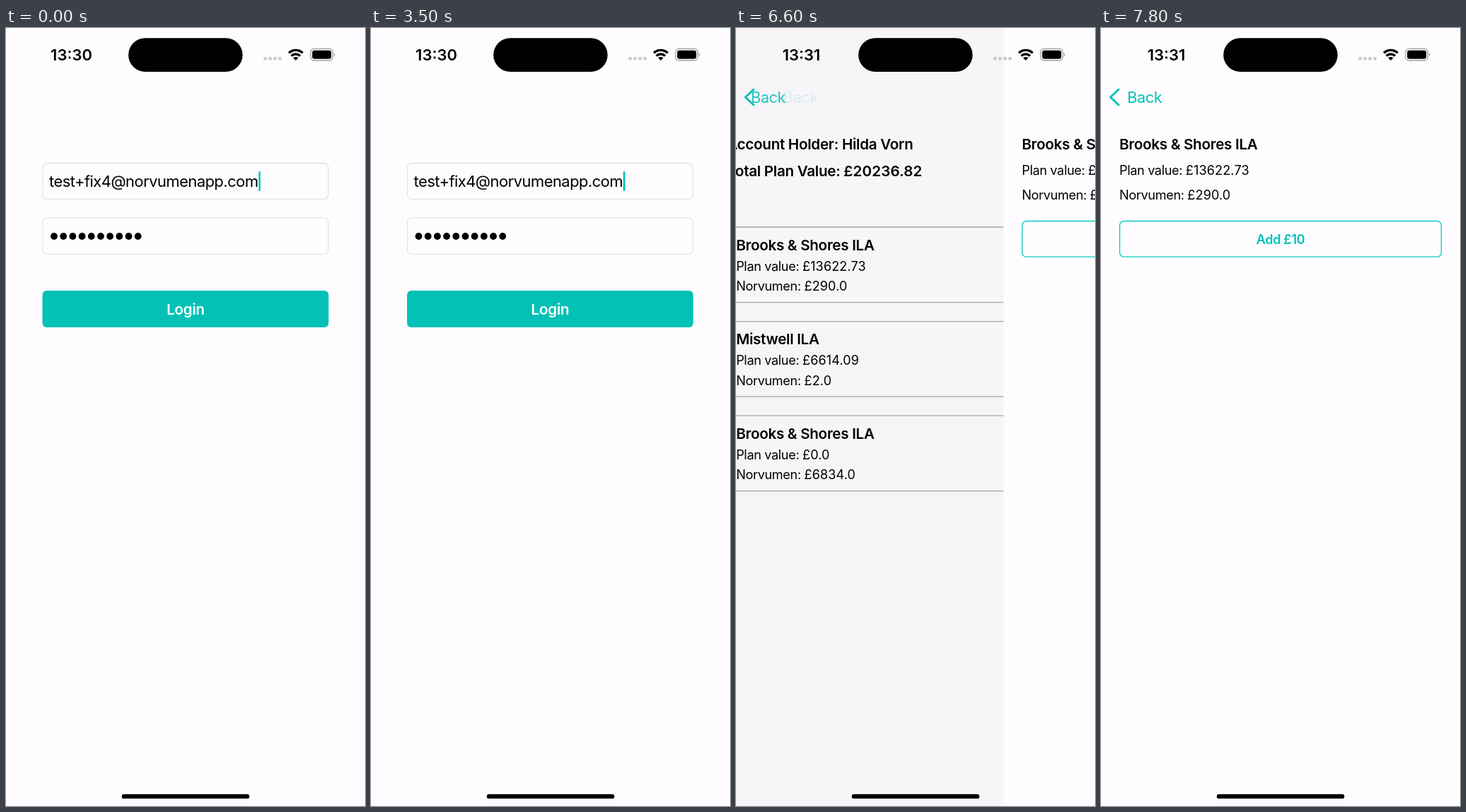
An HTML page that plays this animation: 508x1102 px, repeating every 8000 ms.

```html
<!DOCTYPE html>
<html lang="en">
<head>
<meta charset="utf-8">
<title>Savings app</title>
<style>
  html, body { margin: 0; width: 100%; height: 100%; overflow: hidden; background: #fefcff; }
  svg { display: block; }
  text { font: 18.1px Inter, sans-serif; letter-spacing: -.35px; white-space: pre; }
  .head { font-size: 20.7px; font-weight: 600; letter-spacing: -.32px; }
  .body { font-size: 22px; letter-spacing: -.56px; }
  .clock { font-size: 22px; font-weight: 600; letter-spacing: 0; }
  .sum { letter-spacing: .1px; }
  .bold { font-weight: 600; }
  .mid { text-anchor: middle; }
  .teal { fill: #03c1b6; }
  .white { fill: #fff; }
  .paper { fill: #fefcff; }
  .line { fill: none; stroke-width: 1.3; }
</style>
</head>
<body>
<svg width="508" height="1102" viewBox="0 0 508 1102">
  <g id="login"></g>
  <g id="plans"></g>
  <g id="detail"></g>
  <path id="chevron" d="M25 87 13.3 98 25 109" fill="none" stroke="#03c1b6" stroke-width="3" stroke-linecap="round" stroke-linejoin="round"/>
  <text id="backPlans" class="body teal" y="106">Back</text>
  <text id="backDetail" class="body teal" y="106">Back</text>
  <text id="clock" class="clock mid" x="92.5" y="46"></text>
  <rect x="173.2" y="14.3" width="161.6" height="47.8" rx="23.9"/>
  <g id="signal" fill="#cbc9cc"></g>
  <g fill="none" stroke="#000" stroke-width="3.4">
    <path d="M400.2 35.4a14 14 0 0 1 19.6 0"/>
    <path d="M403.8 39.6a8.8 8.8 0 0 1 12.4 0"/>
    <path d="M410 46l-3.6-3.6a5.2 5.2 0 0 1 7.2 0z" fill="#000" stroke="none"/>
  </g>
  <rect class="line" x="431" y="29.5" width="31.5" height="16.5" rx="5" stroke="#a5a3a6"/>
  <rect x="433.3" y="31.8" width="27" height="12" rx="3.3"/>
  <path d="M464 35.2q3 2.6 0 5.2z" fill="#a5a3a6"/>
  <rect x="163.8" y="1085.2" width="180.6" height="6.4" rx="3.2"/>
</svg>
<script>
const LOOP = 8000, WIDTH = 508;
const $ = id => document.getElementById(id);
const text = (x, y, content, cls = '') => `<text x="${x}" y="${y}" class="${cls}">${content}</text>`;
const amount = (label, sum) => `${label}: <tspan class="sum">£${sum}</tspan>`;
const box = (x, y, w, h, r, stroke) =>
  `<rect class="line" x="${x}" y="${y}" width="${w}" height="${h}" rx="${r}" stroke="${stroke}"/>`;
const page = content =>
  `<rect class="paper" width="508" height="1102"/>${content}<rect class="dim" width="508" height="1102" opacity="0"/>`;

const plans = [
  ['Brooks &amp; Shores ILA', '13622.73', '290.0'],
  ['Mistwell ILA', '6614.09', '2.0'],
  ['Brooks &amp; Shores ILA', '0.0', '6834.0'],
];

const card = ([name, value, saved], i) => `<g transform="translate(0 ${i * 133.6})">
  ${box(26.5, 282, 455, 106.6, 13, '#a8a6a9')}
  ${text(39, 314.5, name, 'head')}
  ${text(39, 343.5, amount('Plan value', value))}
  ${text(39, 372, amount('Norvumen', saved))}</g>`;

const dots = Array.from({ length: 10 }, (_, i) => `<circle cx="${68 + i * 13.2}" cy="295" r="4.9"/>`).join('');

$('login').innerHTML = page(
  box(52, 191.5, 404, 51, 6, '#e5e3e7') + text(61, 225, 'test+fix4@norvumenapp.com', 'body') +
  '<rect id="caret" class="teal" x="357.5" y="203" width="2.6" height="28" rx="1.3"/>' +
  box(52, 268.8, 404, 51.5, 6, '#e5e3e7') + dots +
  '<rect class="teal" x="51.5" y="372" width="405" height="52" rx="6"/>' +
  text(254, 405.5, 'Login', 'head mid white'));

$('plans').innerHTML = page(
  text(26, 172.3, 'Account Holder: Hilda Vorn', 'head') +
  `<g id="loaded">${text(26, 210, amount('Total Plan Value', '20236.82'), 'head')}${plans.map(card).join('')}</g>`);

const [name, value, saved] = plans[0];
$('detail').innerHTML = page(
  text(26, 172.3, name, 'head') +
  text(26, 207.7, amount('Plan value', value)) +
  text(26, 242.7, amount('Norvumen', saved)) +
  box(26.5, 273.5, 455, 50.7, 6, '#0bc9c0') +
  text(254, 305.6, 'Add £10', 'bold mid teal'));

$('signal').innerHTML = [0, 1, 2, 3].map(i =>
  `<rect x="${364.4 + i * 7}" y="41" width="4.6" height="4.6" rx="1.5"/>`).join('');

// Critically damped spring from 0 to 1
const push = (t, start) => {
  const k = Math.max(0, t - start) * .0171;
  return 1 - (1 + k) * Math.exp(-k);
};

const blinks = [[200, 500], [1400, 1900], [2400, 2900]];
const caretOpacity = t => {
  const blink = blinks.find(([from, to]) => t >= from && t <= to);
  if (!blink) return 1;
  const [from, to] = blink;
  const edge = Math.abs(2 * t - from - to) / (to - from);
  return Math.min(1, Math.max(0, 2 * edge - .6));
};

// shown: how far the page has slid in; covered: how far the next one lies over it
function place(id, shown, covered) {
  const x = WIDTH * (1 - shown) - WIDTH * .3 * covered;
  $(id).setAttribute('transform', `translate(${x} 0)`);
  $(id).querySelector('.dim').setAttribute('opacity', covered * .1);
}

function placeBack(id, shown, covered) {
  $(id).setAttribute('x', 37 + 40 * (1 - shown) - 63 * covered);
  $(id).setAttribute('opacity', shown ** 1.5 * (1 - covered ** 1.5));
}

function draw(t) {
  const first = push(t, 3495), second = push(t, 6543);
  place('login', 1, first);
  place('plans', first, second);
  place('detail', second, 0);
  placeBack('backPlans', first, second);
  placeBack('backDetail', second, 0);
  $('chevron').setAttribute('opacity', first);
  $('caret').setAttribute('opacity', caretOpacity(t));
  $('loaded').setAttribute('visibility', t < 4200 ? 'hidden' : 'visible');
  $('clock').textContent = t < 4000 ? '13:30' : '13:31';
}

// The screen refreshes ten times a second
const begin = performance.now();
function tick() {
  const t = (performance.now() - begin) % LOOP;
  draw(Math.floor(t / 100) * 100);
  requestAnimationFrame(tick);
}
tick();
</script>
</body>
</html>
```
